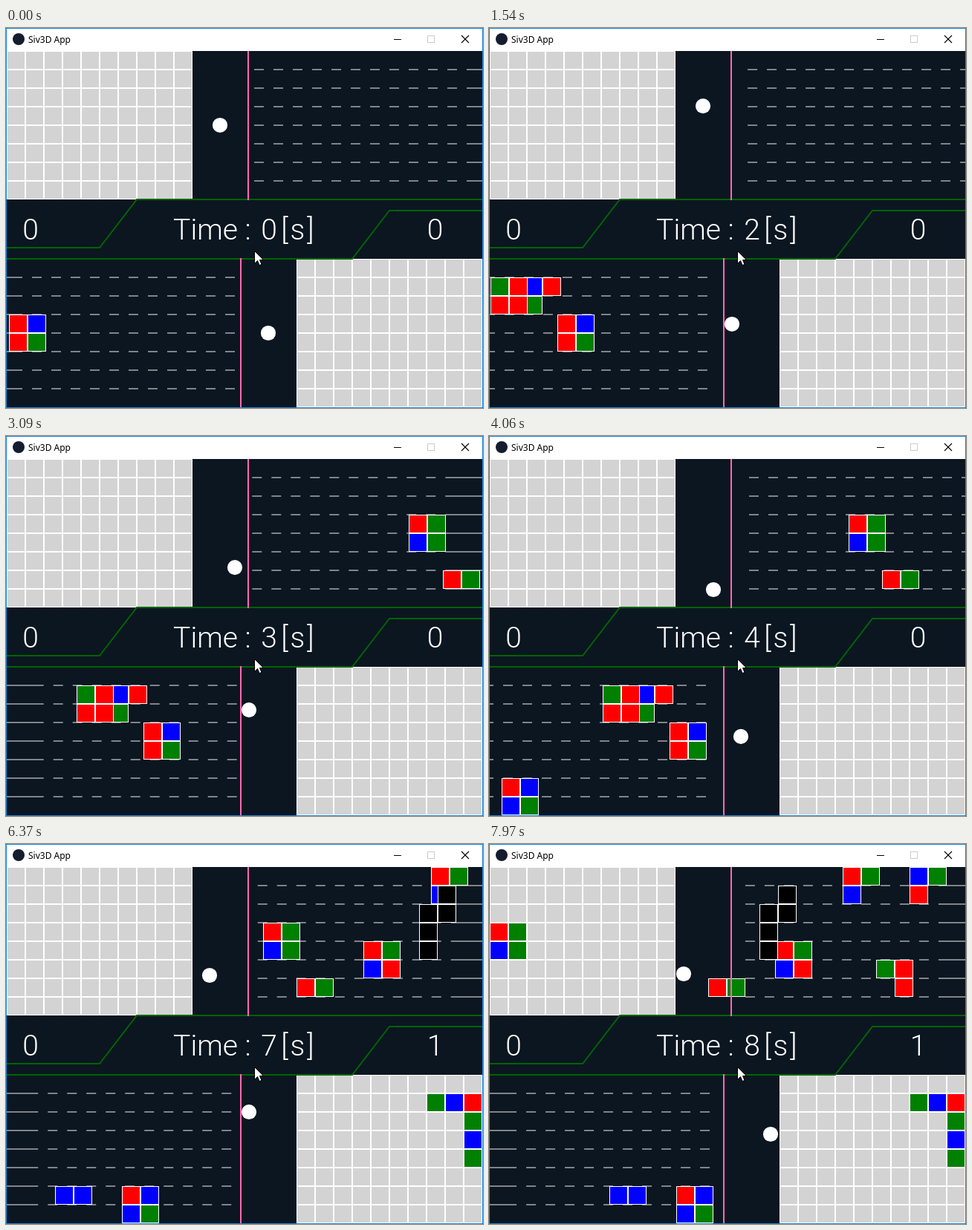
Recreate the animation shown at these times as an HTML page with a canvas. Size 642 px wide and 512 px high, loop 8 s.

```html
<!DOCTYPE html>
<html lang="en">
<head>
<meta charset="utf-8">
<title>Siv3D App</title>
<style>
  html, body { margin: 0; width: 100%; height: 100%; overflow: hidden; background: #0b1621; }
  canvas { display: block; }
</style>
</head>
<body>
<canvas id="stage" width="642" height="512"></canvas>
<script>
const ctx = document.getElementById('stage').getContext('2d');
const LOOP = 8000, CELL = 25;
const COLORS = { R: '#ff0000', G: '#008000', B: '#0000ff', K: '#000000' };

// The lower lane runs right, the upper one left. A piece that has
// travelled the kick distance is shot into the grid.
const LOWER = { y: 311, kick: 267, place: d => Math.min(1 + d, 591) };
const UPPER = { y: 31, kick: 305, place: d => Math.max(591 - d, 1) };
const SHOT_SPEED = 45;
const CLEAR_STEP = 360.5;

// One piece enters every SPAWN_GAP steps.
const SPAWN_GAP = 45.2;
const PIECES = [
  { lane: LOWER, row: 3, cells: 'RB/RG' },
  { lane: LOWER, row: 1, cells: 'BR/G' },
  { lane: LOWER, row: 1, cells: 'GR/RR' },
  { lane: UPPER, row: 3, cells: 'RG/BG' },
  { lane: UPPER, row: 6, cells: 'RG' },
  { lane: LOWER, row: 6, cells: 'RB/BG' },
  { lane: UPPER, row: 4, cells: 'RG/BR' },
  { lane: LOWER, row: 6, cells: 'BB' },
  { lane: UPPER, row: 0, cells: 'RG/B' },
  { lane: UPPER, row: 5, cells: 'GR/.R' },
  { lane: UPPER, row: 0, cells: 'BG/R' }
];

// Where the two players turn, and when.
const TURNS = [0, 1540, 3090, 4060, 5110, 6370, 7970];
const UPPER_PLAYER = [[288, 131], [288, 105], [308, 177], [302, 207], [314, 207], [274, 177], [262, 175]];
const LOWER_PLAYER = [[353, 411], [327, 399], [327, 369], [339, 405], [327, 377], [327, 361], [379, 391]];

// 60 steps a second, after a short hitch at the start.
const stepsAt = t => Math.max(0, t * 0.06 - 4.2);

function rect(color, x, y, w, h) {
  ctx.fillStyle = color;
  ctx.fillRect(x, y, w, h);
}

function path(color, width, ...points) {
  ctx.beginPath();
  points.forEach(([x, y]) => ctx.lineTo(x, y));
  ctx.strokeStyle = color;
  ctx.lineWidth = width;
  ctx.stroke();
}

function frame(color, x, y, w, h) {
  ctx.strokeStyle = color;
  ctx.lineWidth = 1;
  ctx.strokeRect(x + 0.5, y + 0.5, w - 1, h - 1);
}

function disc(color, x, y, r) {
  ctx.beginPath();
  ctx.arc(x, y, r, 0, Math.PI * 2);
  ctx.fillStyle = color;
  ctx.fill();
}

function label(text, x) {
  ctx.font = '300 39px Roboto, sans-serif';
  ctx.textAlign = 'center';
  ctx.fillStyle = '#fff';
  ctx.fillText(text, x, 285);
}

function cell(color, x, y) {
  rect('#fff', x, y, CELL, CELL);
  rect(color, x + 1, y + 1, CELL - 2, CELL - 2);
}

function block(rows, x, y) {
  rows.forEach((row, j) => [...row].forEach((c, i) => {
    if (c !== '.') cell(COLORS[c], Math.round(x) + i * CELL, y + j * CELL);
  }));
}

function grid(x, y) {
  for (let j = 0; j < 8; j++)
    for (let i = 0; i < 10; i++) cell('#d3d3d3', x + i * CELL, y + j * CELL);
}

// A solid lead grows over two dash periods, with whole dashes ahead of it.
function lanes(steps) {
  const lead = (22 + steps * 1.019) % 52;
  const strip = (from, to) => {
    for (let j = 1; j < 8; j++) {
      rect('#808488', from, 310 + j * CELL, to - from, 2);
      rect('#808488', 642 - to, 30 + j * CELL, to - from, 2);
    }
  };
  strip(1, Math.max(1, lead));
  for (let end = lead + 26; end < 312; end += 26) strip(end - 13, end);
}

function piece({ lane, row, cells }, index, steps) {
  const age = steps - (index * SPAWN_GAP - 3);
  const shot = Math.max(0, age - lane.kick);
  if (age < 0 || lane === LOWER && shot && steps >= CLEAR_STEP) return;
  const x = lane.place(age + shot * SHOT_SPEED);
  let rows = cells.split('/');
  if (x === 591 && shot) rows = rows.map(r => r.padStart(2, '.'));
  block(rows, x, lane.y + row * CELL);
}

function player(turns, t) {
  const i = Math.max(1, TURNS.findIndex(ms => ms >= t));
  const next = t > TURNS.at(-1) ? TURNS.length - 1 : i;
  const u = Math.min(1, (t - TURNS[next - 1]) / (TURNS[next] - TURNS[next - 1]));
  const [x, y] = turns[next - 1].map((v, k) => v + (turns[next][k] - v) * u);
  disc('#fff', x, y, 10.1);
}

function scoreBoard(t, cleared) {
  path('#006400', 2, [1, 296], [126, 296], [176, 231], [641, 231]);
  path('#006400', 2, [1, 311], [466, 311], [516, 246], [641, 246]);
  label('Time', 268.5);
  label(':', 325.5);
  label(Math.floor((t + 800) / 1000), 354);
  [...'[s]'].forEach((c, i) => label(c, 375 + i * 17.5));
  label('0', 33);
  label(cleared ? '1' : '0', 577.5);
}

function windowFrame() {
  rect('#fff', 1, 1, 640, 30);
  disc('#141c30', 17, 15, 8);
  ctx.font = '12px "Noto Sans", sans-serif';
  ctx.textAlign = 'left';
  ctx.fillStyle = '#000';
  ctx.fillText('Siv3D App', 30, 20);
  rect('#000', 522, 15, 10, 1);
  frame('#ccc', 567, 10, 10, 10);
  path('#000', 1.1, [613, 10], [623, 20]);
  path('#000', 1.1, [623, 10], [613, 20]);
  frame('#1883d7', 0, 0, 642, 512);
}

function cursor() {
  ctx.save();
  ctx.translate(334.5, 300.5);
  ctx.fillStyle = '#fff';
  ctx.strokeStyle = '#000';
  ctx.lineWidth = 1;
  const arrow = new Path2D('M0 0V17L4 13L6.5 19L9.5 18L7 12H12Z');
  ctx.fill(arrow);
  ctx.stroke(arrow);
  ctx.restore();
}

function draw(t) {
  const steps = stepsAt(t);
  const cleared = steps >= CLEAR_STEP;
  rect('#0b1621', 0, 0, 642, 512);
  grid(1, 31);
  grid(391, 311);
  lanes(steps);
  PIECES.forEach((p, i) => piece(p, i, steps));
  if (cleared) {
    block(['GBR', '..G', '..B', '..G'], 566, 336);
    block(['.K', 'KK', 'K', 'K'], UPPER.place(2 * (steps - CLEAR_STEP)), 56);
  }
  scoreBoard(t, cleared);
  rect('#ff69b4', 325, 31, 2, 201);
  rect('#ff69b4', 315, 310, 2, 201);
  player(UPPER_PLAYER, t);
  player(LOWER_PLAYER, t);
  windowFrame();
  cursor();
}

const began = performance.now();
function tick() {
  draw((performance.now() - began) % LOOP);
  requestAnimationFrame(tick);
}
tick();
</script>
</body>
</html>
```
